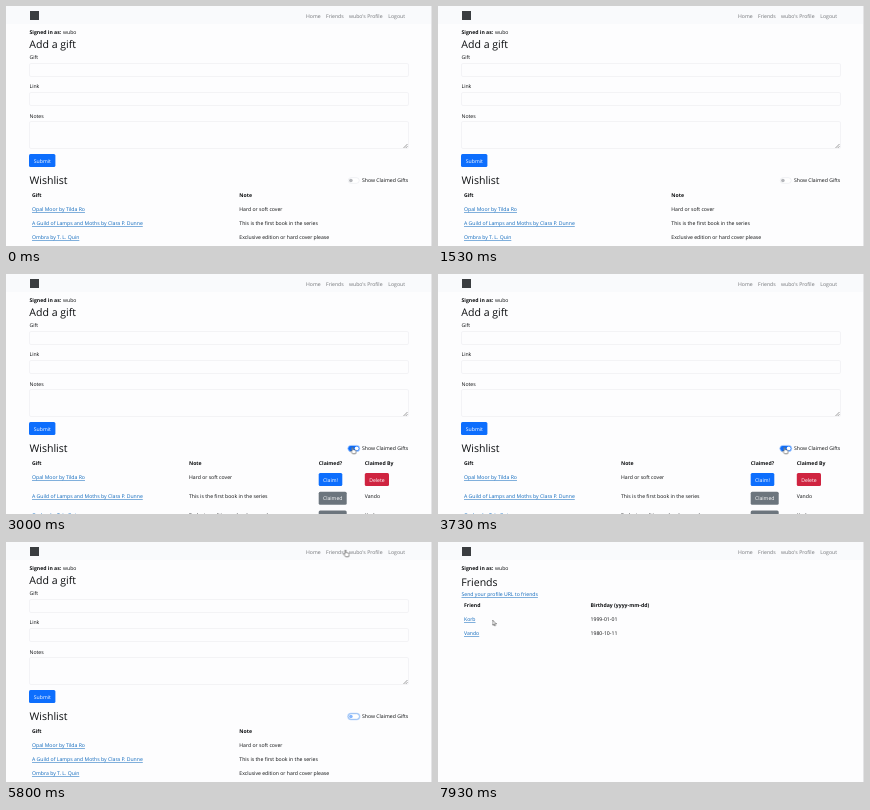
An HTML page that plays this animation: 426x240 px, repeating every 8000 ms.

```html
<!DOCTYPE html>
<html lang="en">
<head>
<meta charset="utf-8">
<title>Wishlist</title>
<style>
  html, body { margin: 0; width: 100%; height: 100%; overflow: hidden; background: #fdfdfe; }
  svg { display: block; width: 100vw; height: 100vh; }
  text { font: 5.15px "Open Sans", "Noto Sans", sans-serif; fill: #0c0e10; text-rendering: geometricPrecision; }
  .title { font-size: 10.55px; }
  .bold { font-weight: 700; }
  .nav text { fill: #727478; }
  .link { fill: #0d68bd; text-decoration: underline; text-decoration-thickness: .4px; }
  .on { fill: #fff; text-anchor: middle; }
  .field { fill: #fdfdfe; stroke: #ecedf0; stroke-width: .6; }
  .blue { fill: #0d6efd; }
  .red { fill: #cf2440; }
  .grey { fill: #6c757d; }

  .anim { animation: 8s step-end infinite; }
  .gifts { animation-name: gifts; }
  .narrow { animation-name: narrow; }
  .wide { animation-name: wide; }
  .focus { animation-name: focus; }
  .friends { animation-name: friends; }
  .hand { animation-name: hand; }
  .arrow { animation-name: arrow; }
  .cursor { animation: move 8s ease-in-out infinite; }

  @keyframes gifts { 0% { visibility: visible } 81.6%, 100% { visibility: hidden } }
  @keyframes narrow { 0%, 63.4% { visibility: visible } 24.1%, 81.6%, 100% { visibility: hidden } }
  @keyframes wide { 0%, 63.4%, 100% { visibility: hidden } 24.1% { visibility: visible } }
  @keyframes focus { 0%, 81.6%, 100% { visibility: hidden } 63.4% { visibility: visible } }
  @keyframes friends { 0% { visibility: hidden } 81.6%, 100% { visibility: visible } }
  @keyframes hand { 0%, 65%, 81.6%, 100% { visibility: hidden } 23%, 70.5% { visibility: visible } }
  @keyframes arrow { 0%, 23%, 70.5% { visibility: hidden } 20%, 65%, 81.6%, 100% { visibility: visible } }
  @keyframes move {
    0%, 20% { transform: translate(300px, 246px) }
    23.5%, 64% { transform: translate(346.5px, 173px) }
    71.5%, 73.5% { transform: translate(339.5px, 8px) }
    77%, 82.5% { transform: translate(329px, 9px) }
    92%, 100% { transform: translate(54.5px, 78px) }
  }
</style>
</head>
<body>
<svg viewBox="0 0 426 240" preserveAspectRatio="none">
  <rect width="426" height="240" fill="#fdfdfe"/>
  <rect width="426" height="18" fill="#f9fafc"/>
  <rect x="425" width="1" height="240" fill="#e4e4e6"/>
  <rect x="24" y="5" width="9" height="9" fill="#3a3d40"/>

  <g class="nav">
    <text x="300" y="11.8">Home</text>
    <text x="320" y="11.8">Friends</text>
    <text x="343" y="11.8">wubo's Profile</text>
    <text x="382.3" y="11.8">Logout</text>
  </g>
  <text class="bold" x="23.5" y="28">Signed in as:</text>
  <text x="57" y="28">wubo</text>

  <g class="anim gifts">
    <text class="title" x="23.3" y="42">Add a gift</text>
    <text x="23.5" y="53">Gift</text>
    <rect class="field" x="23.5" y="57.5" width="379" height="13" rx="1.5"/>
    <text x="23.5" y="82.3">Link</text>
    <rect class="field" x="23.5" y="86.5" width="379" height="13" rx="1.5"/>
    <text x="23.5" y="111.5">Notes</text>
    <rect class="field" x="23.5" y="115.5" width="379" height="27" rx="1.5"/>
    <path d="M397.5 142l4-4M399.7 142l1.8-1.8" stroke="#777" stroke-width=".7"/>
    <rect class="blue" x="23" y="148" width="26.4" height="13" rx="1.5"/>
    <text class="on" x="36.3" y="156.6">Submit</text>
    <text class="title" x="23.5" y="177.8">Wishlist</text>
    <text x="356" y="176.2">Show Claimed Gifts</text>
    <text class="bold" x="26" y="191">Gift</text>
    <text class="link" x="26" y="205.3">Opal Moor by Tilda Ro</text>
  </g>

  <g class="anim narrow">
    <rect x="342.2" y="171.7" width="11" height="5.6" rx="2.8" fill="#fff" stroke="#e3e5e8" stroke-width=".5"/>
    <circle cx="344.9" cy="174.5" r="1.8" fill="#b4b6ba"/>
    <text class="bold" x="233.3" y="191">Note</text>
    <text x="233.3" y="205.3">Hard or soft cover</text>
    <text class="link" x="26" y="219">A Guild of Lamps and Moths by Clara P. Dunne</text>
    <text x="233.3" y="219">This is the first book in the series</text>
    <text class="link" x="26" y="233">Ombra by T. L. Quin</text>
    <text x="233.3" y="233">Exclusive edition or hard cover please</text>
  </g>

  <g class="anim focus">
    <rect x="341.8" y="171.4" width="12" height="6.2" rx="3.1" fill="#fff" stroke="#c2dbfe" stroke-width="1.2"/>
    <rect x="342.2" y="171.7" width="11.2" height="5.6" rx="2.8" fill="#fff" stroke="#6fa5ea" stroke-width=".6"/>
    <circle cx="344.9" cy="174.5" r="1.8" fill="#86b7fe"/>
  </g>

  <g class="anim wide">
    <rect x="341.8" y="171.4" width="12" height="6.2" rx="3.1" fill="#0d6efd" stroke="#b6d4fe" stroke-width=".8"/>
    <circle cx="350.7" cy="174.5" r="2" fill="#fff"/>
    <text class="bold" x="183" y="191">Note</text>
    <text class="bold" x="312.8" y="191">Claimed?</text>
    <text class="bold" x="358.8" y="191">Claimed By</text>
    <text x="183" y="205.3">Hard or soft cover</text>
    <rect class="blue" x="312.7" y="199" width="23.6" height="13" rx="1.5"/>
    <text class="on" x="324.5" y="207.5">Claim!</text>
    <rect class="red" x="358.8" y="199" width="24.2" height="13" rx="1.5"/>
    <text class="on" x="370.9" y="207.5">Delete</text>
    <text class="link" x="26" y="224">A Guild of Lamps and Moths by Clara P. Dunne</text>
    <text x="183" y="224">This is the first book in the series</text>
    <rect class="grey" x="312.7" y="217.8" width="28" height="13" rx="1.5"/>
    <text class="on" x="326.7" y="226.2">Claimed</text>
    <text x="358.8" y="224">Vando</text>
    <text class="link" x="26" y="242.5">Ombra by T. L. Quin</text>
    <text x="183" y="242.5">Exclusive edition or hard cover please</text>
    <rect class="grey" x="312.7" y="236.5" width="28" height="13" rx="1.5"/>
    <text x="358.8" y="242.5">Korb</text>
  </g>

  <g class="anim friends">
    <text class="title" x="23.3" y="43.8">Friends</text>
    <text class="link" x="23.5" y="54.3">Send your profile URL to friends</text>
    <text class="bold" x="26" y="65.2">Friend</text>
    <text class="bold" x="152.5" y="65.2">Birthday (yyyy-mm-dd)</text>
    <text class="link" x="26" y="79">Korb</text>
    <text x="152.5" y="79">1999-01-01</text>
    <text class="link" x="26" y="93">Vando</text>
    <text x="152.5" y="93">1980-10-11</text>
  </g>

  <g class="cursor" fill="#fff" stroke="#222" stroke-width=".5" stroke-linejoin="round">
    <path class="anim hand" d="M-.6 .4Q0-.5 .6 .4V2.6L3.2 3.2Q3.9 3.4 3.7 4.3L3.1 6.8H.1L-1.9 4.2Q-1.8 3.3-.6 4.2Z"/>
    <path class="anim arrow" d="M0 0V5.2L1.2 4.2L2 6L2.8 5.7L2 3.9H3.6Z"/>
  </g>
</svg>
</body>
</html>
```
